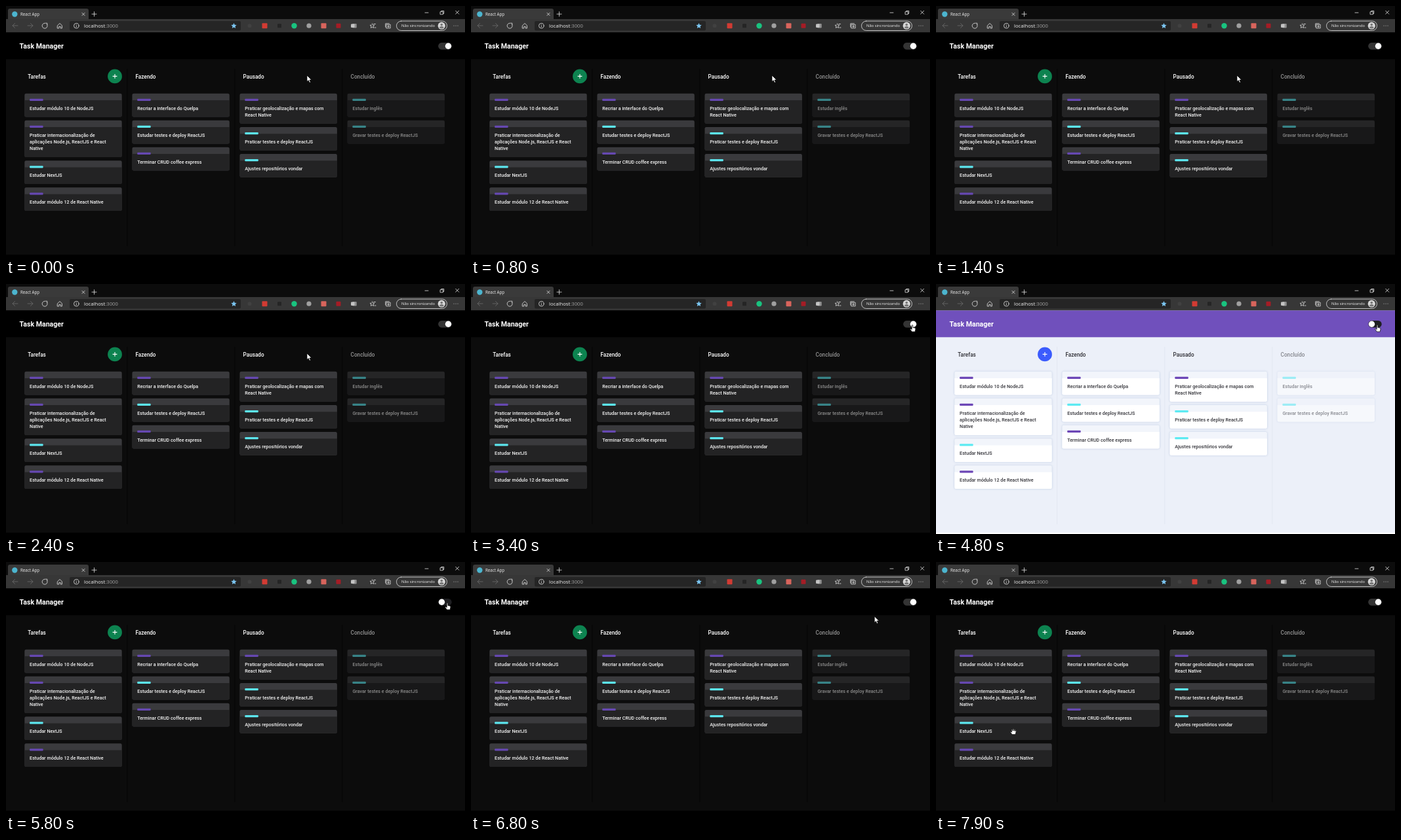
An HTML page that plays this animation: 700x382 px, repeating every 8000 ms.

```html
<!DOCTYPE html>
<html lang="pt-BR">
<head>
<meta charset="utf-8">
<title>Task Manager</title>
<style>
html, body { margin: 0; width: 100%; height: 100%; overflow: hidden; background: #0c0c0c; }
svg { display: block; width: 700px; height: 382px; }
text { font-family: Roboto, sans-serif; font-weight: 500; }
.ui text { font-family: "Open Sans", "Noto Sans", sans-serif; font-weight: 400; fill: #f2f2f2; }
.line { fill: none; stroke: #e4e4e4; stroke-width: .8; stroke-linecap: round; stroke-linejoin: round; }
.dim { stroke: #6c6c6c; }

#app {
  --head: #000; --page: #0c0c0c; --foot: #000; --split: #060606;
  --strip: #3a3a3d; --card: #232324; --text: #f4f4f4; --title: #fff;
  --violet: #6648b2; --cyan: #5ce6ee; --add: #0d8350; --shadow: transparent;
}
#app.light {
  --head: #7050bc; --page: #ecf0f9; --foot: #fff; --split: #e2e7f1;
  --strip: #f2f5fb; --card: #fff; --text: #36363c; --title: #303036;
  --violet: #6c46b6; --cyan: #5ceaf2; --add: #3b5bfd; --shadow: rgba(182, 198, 222, .85);
}
.head { fill: var(--head); }
.page { fill: var(--page); }
.foot { fill: var(--foot); }
.split { stroke: var(--split); stroke-width: 1; }
.title { font-size: 8.2px; fill: var(--title); }
.task { font-size: 7.17px; fill: var(--text); }
.card { filter: drop-shadow(0 .5px 1.5px var(--shadow)); }
.strip { fill: var(--strip); }
.body { fill: var(--card); }
.violet { fill: var(--violet); }
.cyan { fill: var(--cyan); }
.add { fill: var(--add); }
.cursor { fill: #fff; stroke: #000; stroke-width: .7; stroke-linejoin: round; }
</style>
</head>
<body>
<svg viewBox="0 0 700 382">
  <g class="ui">
    <rect width="700" height="41" fill="#0c0c0c"/>
    <path d="M3 21V7q0-3 3-3H123q3 0 3 3V21Z" fill="#3a3a3a"/>
    <rect y="20" width="700" height="20.5" fill="#373737"/>
    <circle cx="13.3" cy="12.5" r="4.2" fill="#4cb5cf"/>
    <text x="22" y="14.8" font-size="6.2">React App</text>
    <path class="line" d="M116 10.5l4 4m0-4l-4 4M131 12.3h7m-3.5-3.5v7"/>
    <path class="line" d="M639 10.2h5M662.5 8.8h4v4h-4zM663.8 8.6V7.5h4v4h-1M685.7 7.3l5 5m0-5l-5 5"/>
    <path class="line dim" d="M18 30h-8m3.5-3.5L10 30l3.5 3.5M33 30h8m-3.5-3.5L41 30l-3.5 3.5"/>
    <path class="line" d="M62.5 28a4 4 0 1 1-3-1.8M60.5 26.2h2.3v2.3"/>
    <path class="line" d="M78.6 29.7L82 26.5l3.4 3.2V34h-2.2v-2.6h-2.4V34h-2.2z"/>
    <rect x="97" y="23" width="261" height="14.5" rx="2" fill="#252525"/>
    <circle class="line" cx="107.3" cy="30.2" r="3.8"/>
    <path class="line" d="M107.3 30v2.1M107.3 28.2v.1"/>
    <text x="119" y="33" font-size="7.7">localhost<tspan fill="#a4a4a4">:3000</tspan></text>
    <path d="M347.5 26l1.2 2.8 3 .3-2.2 2 .6 3-2.6-1.6-2.6 1.6.6-3-2.2-2 3-.3z" fill="#7cc6f2"/>
    <g id="addons"></g>
    <path class="line" d="M558.5 26.8l1 2.3 2.4.3-1.8 1.6.4 2.4-2-1.2-2 1.2.4-2.4-1.8-1.6 2.4-.3M561 27.5h2.5M562 33h2"/>
    <path class="line" d="M580.2 28.3h6v5.5h-6zM578.8 32V26.8h5.5M583.2 29.6v3m-1.5-1.5h3"/>
    <rect class="line" x="595.5" y="23" width="77" height="14.5" rx="7.2"/>
    <text x="603" y="32.4" font-size="5.86">Não sincronizando</text>
    <circle cx="664.3" cy="30.2" r="5.6" fill="#d6d6d6"/>
    <circle cx="664.3" cy="28.6" r="1.8" fill="#777"/>
    <path d="M661 33.4q0-2.5 3.3-2.5t3.3 2.5q-3.3 2-6.6 0z" fill="#777"/>
    <path class="line" d="M683 30.2h.1M686 30.2h.1M689 30.2h.1"/>
  </g>
  <g id="app">
    <rect class="page" y="40.5" width="700" height="341.5"/>
    <rect class="head" y="40.5" width="700" height="40.8"/>
    <rect class="foot" y="380" width="700" height="2"/>
    <text x="20.6" y="65" font-size="10.6" fill="#fff" style="font-weight:700">Task Manager</text>
    <rect x="659.3" y="56" width="20.4" height="10.4" rx="5.2" fill="#1f1f22"/>
    <rect id="track" x="659.3" y="56" width="20.4" height="10.4" rx="5.2" fill="#343434"/>
    <circle id="knob" cy="61.2" r="4.7" fill="#fff"/>
    <g id="board"></g>
    <circle class="add" cx="166" cy="107.4" r="10.9"/>
    <path d="M162.6 107.4h6.8M166 104v6.8" stroke="#fff" stroke-width="1.1"/>
  </g>
  <g id="cursor">
    <path class="cursor" data-kind="arrow" d="M0 0V9.6L2.2 7.6 3.8 11.2 5.5 10.4 3.9 7H7Z"/>
    <path class="cursor" data-kind="point" d="M-.8.6Q0-.7.9.6V4L4 4.6Q5.2 5 5 6.4L4.2 10.4H-.6L-3.2 6.8Q-3.4 5.4-2.2 5.8L-.8 7Z"/>
    <path class="cursor" data-kind="grab" d="M-2 4.6L-4.3 1.2Q-4.5-.2-3.2.2L-2.2 1-3-2.4Q-2.5-3.8-1.6-2.6L-1-1-.9-3.6Q0-5 .7-3.6L.9-1 1.5-3.2Q2.5-4.2 2.8-2.8L2.6-.4 3.2-1.6Q4.4-2.2 4.4-.8L3.2 4.6Z"/>
  </g>
</svg>
<script>
const $ = id => document.getElementById(id);
const LOOP = 8000, STEP = 100;
const LINE = 10.25, GAP = 5.1, CARD_W = 148.4, TOP = 133.7;

// A leading "+" marks a cyan label, "|" breaks the line.
const columns = [
  ["Tarefas", "Estudar módulo 10 de NodeJS",
    "Praticar internacionalização de|aplicações Node.js, ReactJS e React|Native",
    "+Estudar NextJS", "Estudar módulo 12 de React Native"],
  ["Fazendo", "Recriar a interface do Quelpa", "+Estudar testes e deploy ReactJS",
    "Terminar CRUD coffee express"],
  ["Pausado", "Praticar geolocalização e mapas com|React Native",
    "+Praticar testes e deploy ReactJS", "+Ajustes repositórios vondar"],
  ["Concluído", "+Estudar inglês", "+Gravar testes e deploy ReactJS"]
];

const hits = [];

function card(task, x, y) {
  const cyan = task[0] === "+";
  const lines = task.replace("+", "").split("|");
  const h = 25.65 + lines.length * LINE;
  hits.push({ x, y, w: CARD_W, h, kind: "grab" });
  const text = lines.map((s, i) =>
    `<text class="task" x="${x + 7.8}" y="${y + 25 + i * LINE}">${s}</text>`).join("");
  const svg = `<g class="card">
    <rect class="strip" x="${x}" y="${y}" width="${CARD_W}" height="${h}" rx="2.4"/>
    <path class="body" d="M${x} ${y + LINE}h${CARD_W}v${h - LINE - 2.4}q0 2.4-2.4 2.4h${4.8 - CARD_W}q-2.4 0-2.4-2.4z"/></g>
    <rect class="${cyan ? "cyan" : "violet"}" x="${x + 7.8}" y="${y + 8}" width="20.5" height="3.4" rx="1"/>${text}`;
  return { svg, h };
}

function column([name, ...tasks], i) {
  const x = 28.3 + i * 164.1;
  let y = TOP, cards = "";
  for (const task of tasks) {
    const c = card(task, x, y);
    cards += c.svg;
    y += c.h + GAP;
  }
  const split = i ? `<path class="split" d="M${x - 7.7} 96V367"/>` : "";
  return `${split}<g opacity="${name === "Concluído" ? .55 : 1}">
    <text class="title" x="${x + 5}" y="110.6">${name}</text>${cards}</g>`;
}

$("board").innerHTML = columns.map(column).join("");
hits.push({ x: 659, y: 56, w: 21, h: 11, kind: "point" },
          { x: 155, y: 96, w: 22, h: 22, kind: "point" });

const dot = (x, r, color) => `<circle cx="${x}" cy="30.2" r="${r}" fill="${color}"/>`;
const box = (x, s, color) =>
  `<rect x="${x - s / 2}" y="${30.2 - s / 2}" width="${s}" height="${s}" rx="1" fill="${color}"/>`;
$("addons").innerHTML = dot(371.5, 3, "#414141") + box(394.5, 8, "#d23b33") + box(417, 6, "#252525") +
  dot(439.5, 4.2, "#19c37f") + dot(462, 3.6, "#a0a0a0") + box(484.5, 8, "#d8645c") +
  box(507, 7, "#a51c26") + box(531.5, 6.5, "#8f8f8f") + box(528.8, 5.5, "#c4c4c4");

// Cursor stops: [ms, x, y]
const path = [[0, 459, 106], [2800, 459, 106], [3400, 673, 62.5],
              [6600, 673, 62.5], [7600, 118, 259], [LOOP, 118, 259]];
const clamp = v => Math.min(1, Math.max(0, v));
const ease = v => v * v * (3 - 2 * v);

function cursorAt(t) {
  const i = path.findIndex(p => p[0] > t);
  const [t0, x0, y0] = path[i - 1], [t1, x1, y1] = path[i];
  const k = ease((t - t0) / (t1 - t0));
  return [x0 + (x1 - x0) * k, y0 + (y1 - y0) * k];
}

function kindAt(x, y) {
  const hit = hits.find(r => x >= r.x && x <= r.x + r.w && y >= r.y && y <= r.y + r.h);
  return hit ? hit.kind : "arrow";
}

const shapes = [...document.querySelectorAll("[data-kind]")];

function render(now) {
  const t = Math.floor((now % LOOP) / STEP) * STEP;
  const light = t >= 4300 && t < 5800;
  const on = t < 4300 ? 1 : ease(clamp((t - 5800) / 300));
  $("app").classList.toggle("light", light);
  $("knob").setAttribute("cx", 664.5 + 10 * on);
  $("track").setAttribute("opacity", on);

  const [x, y] = cursorAt(t);
  const kind = kindAt(x, y);
  $("cursor").setAttribute("transform", `translate(${x} ${y})`);
  for (const s of shapes) s.style.display = s.dataset.kind === kind ? "" : "none";
}

const start = performance.now();
function tick() {
  render(performance.now() - start);
  requestAnimationFrame(tick);
}
tick();
</script>
</body>
</html>
```
